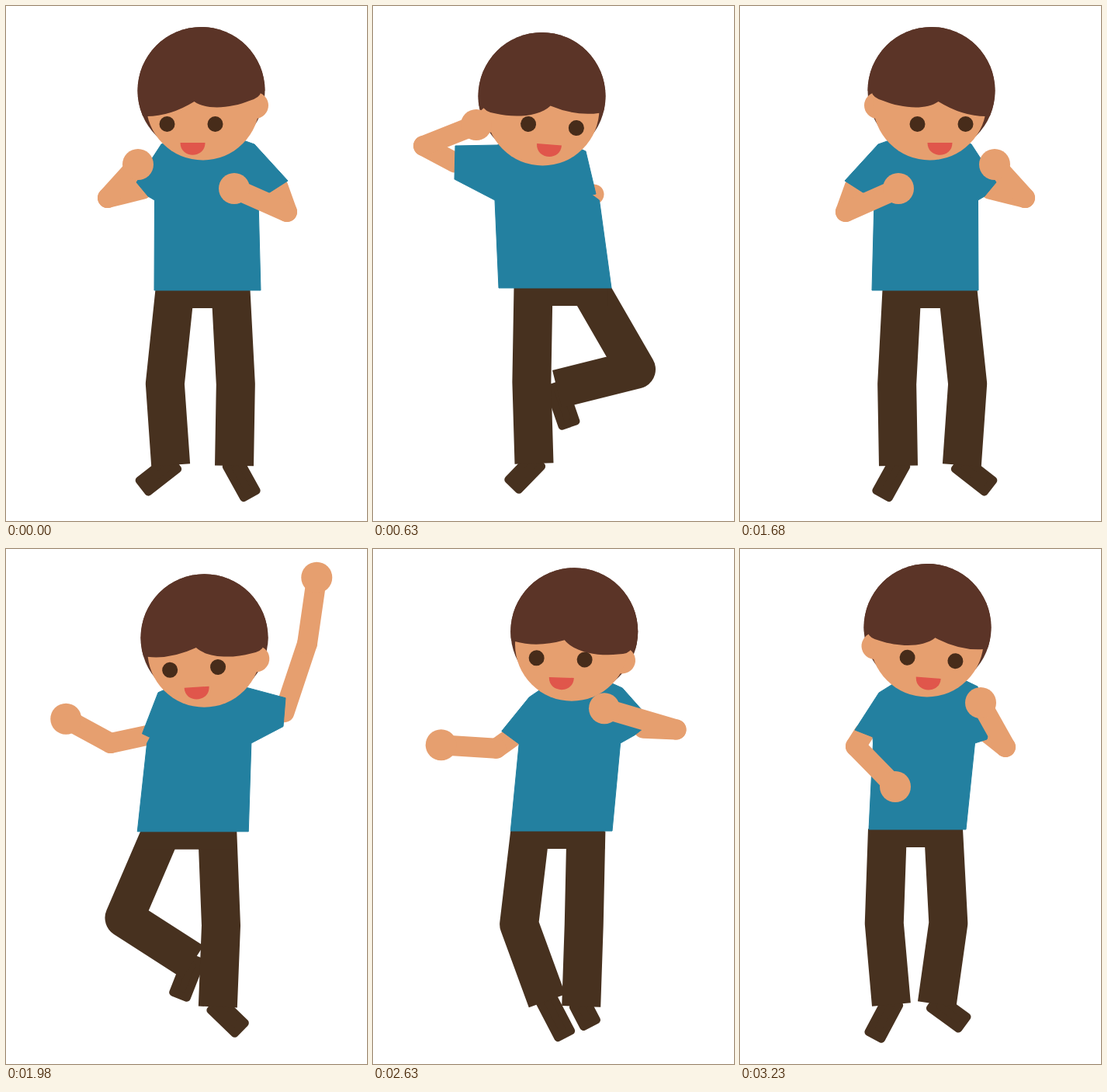
These frames come from a looping animation (465x663 px, 3.38 s). An HTML page:

```html
<!DOCTYPE html>
<html lang="en">
<head>
<meta charset="utf-8">
<title>Dancing boy</title>
<style>
  html, body { margin: 0; width: 100%; height: 100%; overflow: hidden; background: #fff; }
  svg { display: block; width: 465px; height: 663px; }
</style>
</head>
<body>
<svg id="stage" viewBox="0 0 465 663"></svg>
<script>
const SKIN = '#e69f6f', HAIR = '#5b3427', SHIRT = '#2380a0', PANTS = '#47311f', EYE = '#472c1a', MOUTH = '#e0564b';
const LOOP = 3380, HALF_STEPS = 11;
const THIGH = 121, SHIN = 105, HIP = 36;

// axis: sum of an x and its mirrored x. leg: thigh, shin and foot angle from straight down, foot length.
const guard = {
  axis: 498, pelvis: [253.5, 366], hem: [191, 328],
  head: { at: [251.5, 109], facing: -1, look: 13, lean: 0, tilt: 0 },
  left: { shoulder: [200, 178], cuff: [[168, 227], [183, 245]], elbow: [131, 247], hand: [170, 204], leg: [-6, 4, -52, 49] },
  right: { shoulder: [320, 178], cuff: [[363, 225], [338, 241]], elbow: [362, 265], hand: [294, 235], leg: [3, -1, 29, 47], behind: 0 }
};
const salute = {
  axis: 476, pelvis: [242.5, 363], hem: [162, 307],
  head: { at: [217.5, 116], facing: 1, look: 13.5, lean: 4.7, tilt: -9 },
  left: { shoulder: [160, 179], cuff: [[106, 180], [105, 223]], elbow: [65, 180], hand: [133, 153], leg: [-1, 1.7, -44, 43] },
  right: { shoulder: [274, 187], cuff: [[287, 242], [282, 243]], elbow: [275, 245], hand: [245, 280], leg: [30, -76, 19, 52], behind: 1 }
};
const punch = {
  axis: 492, pelvis: [236, 363], hem: [170, 296],
  head: { at: [216.5, 103], facing: 1, look: 19, lean: -4.2, tilt: -18 },
  left: { shoulder: [153, 179], cuff: [[120, 236], [150, 245]], elbow: [119, 250], hand: [193, 236], leg: [2, 2, -22, 25] },
  right: { shoulder: [275, 192], cuff: [[318, 232], [288, 255]], elbow: [318, 250], hand: [396, 243], leg: [-1, -1.5, -43, 54], behind: 0 }
};
const sway = {
  axis: 494, pelvis: [268, 361], hem: [203, 328],
  head: { at: [252.5, 101], facing: -1, look: 5, lean: 4.2, tilt: -4 },
  left: { shoulder: [188, 177], cuff: [[172, 230], [176, 245]], elbow: [152, 255], hand: [184, 198], leg: [-3, 8, -54, 46] },
  right: { shoulder: [315, 185], cuff: [[346, 233], [323, 242]], elbow: [345, 254], hand: [294, 306], leg: [2, -5, 28, 50], behind: 0 }
};

// sweep: how far elbow and hand swing out halfway through a move.
const MOVES = [
  { from: guard, to: salute, steps: 4, drift: 1, sweep: {
    left: { elbow: [12, -75], hand: [-61, -129] }, right: { elbow: [50, 0], hand: [147, -50] } } },
  { from: salute, to: punch, steps: 4, drift: 0, sweep: {
    left: { elbow: [-20, 0], hand: [0, -10] }, right: { elbow: [10, 8], hand: [30, 0] } } },
  { from: punch, to: sway, steps: 2, drift: 1 },
  { from: sway, to: guard, steps: 1, drift: 1 }
];

const easeOut = t => 1 - (1 - t) ** 2;
const midpoint = ([a, b]) => mix(a, b, .5);

function mix(a, b, t) {
  if (typeof a === 'number') return a + (b - a) * t;
  if (Array.isArray(a)) return a.map((v, i) => mix(v, b[i], t));
  return Object.fromEntries(Object.keys(a).map(key => [key, mix(a[key], b[key], t)]));
}

function poseAt(step) {
  let move = 0;
  while (step >= MOVES[move].steps) step -= MOVES[move++].steps;
  const { from, to, steps, drift, sweep = {} } = MOVES[move];
  const t = step / steps, pose = mix(from, to, easeOut(t));
  pose.axis = mix(from.axis, to.axis, drift * easeOut(t));
  for (const side in sweep) for (const joint in sweep[side]) {
    pose[side][joint] = pose[side][joint].map((v, i) => v + sweep[side][joint][i] * Math.sin(Math.PI * t));
  }
  return pose;
}

const circle = (x, y, r, fill) => `<circle cx="${x}" cy="${y}" r="${r}" fill="${fill}"/>`;
const polygon = (points, fill, edge) => `<polygon points="${points}" fill="${fill}"
  stroke="${fill}" stroke-width="${edge}" stroke-linejoin="round"/>`;
const line = (points, width, color, cap = 'butt') => `<polyline points="${points}" fill="none"
  stroke="${color}" stroke-width="${width}" stroke-linecap="${cap}" stroke-linejoin="round"/>`;

function along([x, y], degrees, length) {
  const angle = degrees * Math.PI / 180;
  return [x + Math.sin(angle) * length, y + Math.cos(angle) * length];
}

function foot(ankle, angle, length) {
  const round = 5, half = 14.5 - round;
  const heel = along(ankle, angle, -4), tip = along(ankle, angle, length - round);
  return polygon([along(heel, angle + 90, half), along(tip, angle + 90, half),
    along(tip, angle - 90, half), along(heel, angle - 90, half)], PANTS, 2 * round);
}

function leg([thigh, shin, turn, length], hip) {
  const knee = along(hip, thigh, THIGH), ankle = along(knee, shin, SHIN);
  return foot(ankle, turn, length) + line([hip, knee, ankle], 50, PANTS);
}

function legs({ pelvis: [x, y], left, right }) {
  return leg(right.leg, [x + HIP, y]) + leg(left.leg, [x - HIP, y]) +
    line([[x - HIP - 24, y + 9], [x + HIP + 24, y + 9]], 28, PANTS);
}

const upperArm = ({ cuff, elbow }) => line([midpoint(cuff), elbow], 26, SKIN, 'round');
const forearm = ({ elbow, hand }) => line([elbow, hand], 26, SKIN, 'round') + circle(...hand, 20, SKIN);

function shirt({ head, pelvis, hem, left, right }) {
  const pit = ({ shoulder }, hemX, out) => [(shoulder[0] + hemX) / 2 + out, 250];
  const [x, y] = head.at;
  return polygon([
    [x, y + 45], left.shoulder, ...left.cuff, pit(left, hem[0], -4), [hem[0], pelvis[1]],
    [hem[1], pelvis[1]], pit(right, hem[1], 1), right.cuff[1], right.cuff[0], right.shoulder
  ], SHIRT, 1);
}

function head({ at, facing, look, lean, tilt }) {
  const tilted = shape => `<g transform="rotate(${tilt})">${shape}</g>`;
  return `<g transform="translate(${at}) scale(${facing < 0 ? -1 : 1} 1)">` +
    circle(0, 0, 82, HAIR) + tilted(circle(-69.5, 19, 17, SKIN)) + circle(-2 - tilt / 3, 16.5, 73, SKIN) +
    `<g clip-path="url(#skull)">` +
    tilted(`<path fill="${HAIR}" d="M70 33Q40 33 9 14C-8 26-40 22-62 13Q-76 9-77 1L-110-5V-130H110V33Z"/>`) + `</g>
    <g transform="translate(${look} ${43 + tilt / 2}) rotate(${lean})">` +
    circle(-31, 0, 10, EYE) + circle(31, 0, 10, EYE) +
    `<path transform="translate(-2 24)" fill="${MOUTH}" d="M-16 0H16C16 21-16 21-16 0Z"/></g></g>`;
}

function figure(pose) {
  const { left, right } = pose, hidden = right.behind > .5;
  return legs(pose) + upperArm(left) + upperArm(right) + (hidden ? forearm(right) : '') +
    shirt(pose) + head(pose.head) + forearm(left) + (hidden ? '' : forearm(right));
}

// Steps last 150 ms, apart from two slightly longer ones.
const startOf = step => 150 * step + (step > 3 ? 30 : 0) + (step > 14 ? 50 : 0);

const stage = document.getElementById('stage');
const started = performance.now();
let shown = -1;

function draw(time) {
  let step = 0;
  while (step + 1 < 2 * HALF_STEPS && startOf(step + 1) <= time) step++;
  if (step === shown) return;
  shown = step;
  const pose = poseAt(step % HALF_STEPS);
  const flip = step >= HALF_STEPS ? `transform="translate(${pose.axis} 0) scale(-1 1)"` : '';
  stage.innerHTML = `<clipPath id="skull"><circle r="82"/></clipPath><g ${flip}>${figure(pose)}</g>`;
}

function tick() {
  draw((performance.now() - started) % LOOP);
  requestAnimationFrame(tick);
}
tick();
</script>
</body>
</html>
```
